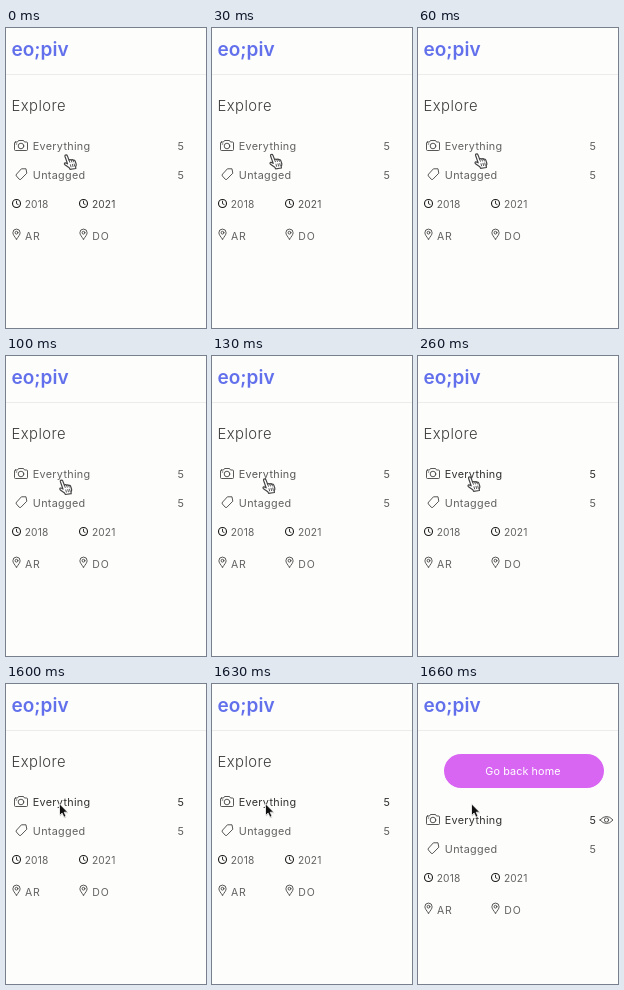
An HTML page that plays this animation: 200 px wide and 300 px high, repeating every 2.8 s.

```html
<!DOCTYPE html>
<html lang="en">
<head>
<meta charset="utf-8">
<title>Explore</title>
<style>
  html, body { margin: 0; width: 100%; height: 100%; overflow: hidden; background: #fdfdfb; }
  svg { display: block; width: 100vw; height: 100vh; }
  text { font-family: Inter, sans-serif; font-size: 10.8px; letter-spacing: .3px; fill: #626262; }
  .logo { font-size: 19px; font-weight: 600; letter-spacing: 0; fill: #6270ec; }
  .title { font-size: 14.8px; font-weight: 300; letter-spacing: .45px; fill: #3c3c3c; }
  .small { font-size: 10.2px; letter-spacing: .1px; }
  .place { font-size: 10.5px; letter-spacing: .8px; }
  .button { fill: #fff; letter-spacing: .1px; text-anchor: middle; }
  .icon { fill: none; stroke: #444; stroke-width: .9; stroke-linejoin: round; stroke-linecap: round; }
</style>
</head>
<body>
<svg viewBox="0 0 200 300">
  <defs>
    <g id="clock" class="icon">
      <circle r="4" stroke="#1a1a1a" stroke-width="1.1"/>
      <path d="M0-2.3V.2L1.6 1" stroke="#1a1a1a"/>
    </g>
    <g id="pin" class="icon">
      <path d="M0 5.2C-2 2.5-3.6.6-3.6-1.3a3.6 3.6 0 0 1 7.2 0C3.6.6 2 2.5 0 5.2z"/>
      <circle cy="-1.3" r="1.4"/>
    </g>
  </defs>

  <rect width="200" height="300" fill="#fdfdfb"/>
  <text class="logo" x="5.5" y="28">eo;piv</text>
  <path d="M0 46.5H200" stroke="#ececec"/>
  <text id="title" class="title" x="5.5" y="83.2">Explore</text>
  <g id="button">
    <rect x="26" y="70" width="160" height="34" rx="17" fill="#d966f3"/>
    <text class="button" x="105" y="90.5">Go back home</text>
  </g>

  <g id="list">
    <g class="icon">
      <path d="M9.5 114H11.5L12.5 112.5H17.5L18.5 114H20.5Q21.5 114 21.5 115V121.5Q21.5 122.5 20.5 122.5H9.5Q8.5 122.5 8.5 121.5V115Q8.5 114 9.5 114z"/>
      <circle cx="15" cy="118" r="2.8"/>
      <path d="M10.2 116H10.8M15.8 140.8L20 140.8 20.8 145.2 14.8 151.3Q14 152 13.2 151.2L10.3 147.9Q9.7 147 10.4 146.3z"/>
    </g>
    <g id="active">
      <text x="26.8" y="122.2">Everything</text>
      <text x="171.4" y="122.2">5</text>
    </g>
    <text x="26.8" y="151.4">Untagged</text>
    <text x="171.4" y="151.4">5</text>
    <use href="#clock" x="10.5" y="175.5"/>
    <text class="small" x="18.8" y="180.3">2018</text>
    <use href="#clock" x="77.5" y="175.5"/>
    <text id="year" class="small" x="86" y="180.3">2021</text>
    <use href="#pin" x="10.5" y="206"/>
    <text class="place" x="19" y="211.7">AR</text>
    <use href="#pin" x="77.5" y="206"/>
    <text class="place" x="86.3" y="211.7">DO</text>
    <g id="eye" class="icon">
      <path d="M182 118Q188.5 110.8 195 118Q188.5 125.2 182 118z"/>
      <circle cx="188.5" cy="118" r="2.1"/>
    </g>
  </g>

  <g id="hand" stroke-linejoin="round" stroke-linecap="round">
    <path d="M3.8 9.2L1.2 1.8Q.9.4 2.1.2 3.1 0 3.6 1.2L5.2 5.4Q6.3 4.3 7.4 5.3 8.6 4.4 9.5 5.6 10.9 5 11.4 6.4L12.4 9.4Q12.6 11 11.8 12L12 13.8 6.2 14.6 5.4 13 1.1 10Q.1 8.8 1.1 8.2 2 7.8 3.8 9.2z" fill="#fff" stroke="#444" stroke-width="1.2"/>
    <path d="M5.2 5.4L6 7.6M7.4 5.3L8 7.3M9.5 5.6L10 7.2M6.6 10L7.2 12.2M8.6 9.6L9.2 11.9M10.4 9.3L10.9 11.5" fill="none" stroke="#444" stroke-width=".9"/>
  </g>
  <g id="arrow" transform="translate(53.5 119.8)">
    <path d="M.5 1V12.8L3.1 10.3 4.9 14.4 7 13.5 5.2 9.4H8.8z" fill="#000" opacity=".2"/>
    <path d="M0 0V11.8L2.6 9.3 4.4 13.4 6.5 12.5 4.7 8.4H8.3z" fill="#111" stroke="#fff" stroke-width=".8"/>
  </g>
</svg>
<script>
  const LOOP = 2800, ARROW = 1600, OPEN = 1660;
  // time, then offset from the resting place of the hand
  const steps = [
    [0, 8.4, 6], [30, 8, 5.5], [60, 7, 5], [100, 3.8, 3.2],
    [130, 1, 2], [160, .6, 1.2], [230, .2, .5], [260, 0, 0]
  ];
  const el = id => document.getElementById(id);
  const [title, button, list, active, year, eye, hand, arrow] =
    ['title', 'button', 'list', 'active', 'year', 'eye', 'hand', 'arrow'].map(el);
  const labels = active.querySelectorAll('text');
  const show = (node, on) => node.setAttribute('visibility', on ? 'visible' : 'hidden');
  const ramp = (t, a, b) => Math.min(1, Math.max(0, (t - a) / (b - a)));
  const grey = (a, b, k) => {
    const v = Math.round(a + (b - a) * k);
    return `rgb(${v},${v},${v})`;
  };

  function draw(t) {
    const open = t >= OPEN;
    const [, dx, dy] = steps.filter(s => s[0] <= t).pop();
    hand.setAttribute('transform', `translate(${49.4 + dx} ${120.7 + dy})`);
    list.setAttribute('transform', `translate(0 ${open ? 18 : 0})`);
    show(hand, t < ARROW);
    show(arrow, t >= ARROW);
    show(title, !open);
    show(button, open);
    show(eye, open);
    labels.forEach(n => n.style.fill = grey(98, 50, ramp(t, 100, 260)));
    year.style.fill = grey(70, 98, ramp(t, 0, 60));
  }

  function tick() {
    draw(performance.now() % LOOP);
    requestAnimationFrame(tick);
  }
  tick();
</script>
</body>
</html>
```
